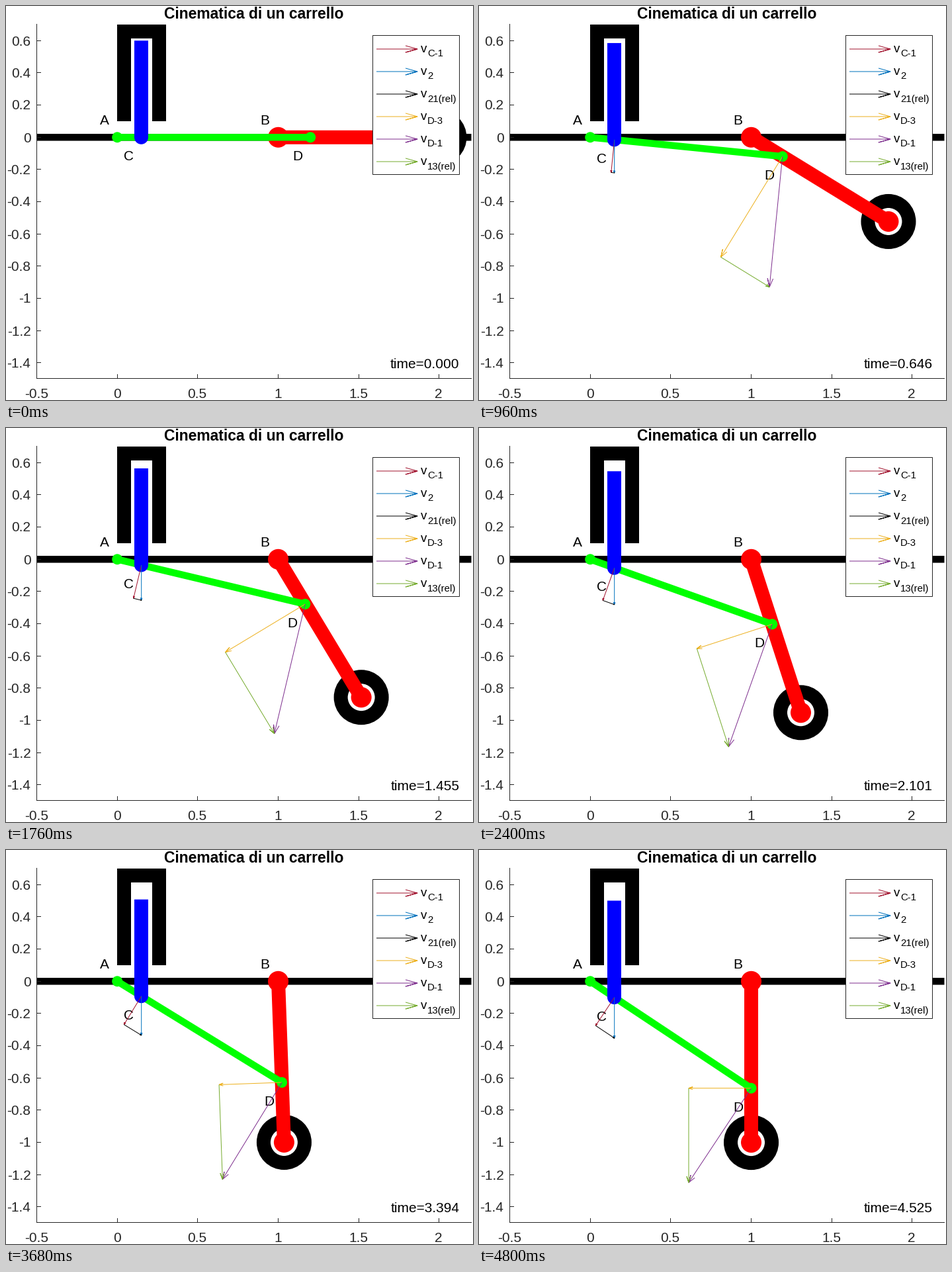
A matplotlib script that plays this animation: 706x595 px, repeating every 4.88 s.

```python
import numpy as np
import matplotlib.pyplot as plt
from matplotlib.animation import FuncAnimation
from matplotlib.patches import Circle, Rectangle

W, H, DPI = 706, 595, 100
FRAMES, INTERVAL = 61, 80
UNIT, X0, Y0 = 243.33, 168.2, 198.3
PX = 72 / DPI
DARK = "#262626"
GREEN = "#00ff00"
STEP = 8 / 99
ARM, CRANK_X = 1.2, 0.15
END_ANGLE = np.arccos(1 / ARM)

plt.rcParams["font.family"] = "Liberation Sans"
plt.rcParams["path.snap"] = False
fig = plt.figure(figsize=(W / DPI, H / DPI), dpi=DPI, facecolor="white")
ax = fig.add_axes([0, 0, 1, 1])
ax.set_xlim(0, W)
ax.set_ylim(H, 0)
ax.axis("off")


def to_px(p):
    return np.array([X0 + UNIT * p[0], Y0 - UNIT * p[1]])


def line(xs, ys, color, width, z):
    return ax.plot(xs, ys, color=color, lw=width * PX, zorder=z, snap=False,
                   solid_capstyle="butt", solid_joinstyle="bevel")[0]


def disc(center, radius, color, z):
    return ax.add_patch(Circle(center, radius, fc=color, ec="none", zorder=z))


def box(x, y, w, h, color, z):
    return ax.add_patch(Rectangle((x, y), w, h, fc=color, ec="none", zorder=z,
                                  snap=False))


def label(x, y, s, size=15, ha="center", color="black", z=8, **kw):
    return ax.text(x, y, s, fontsize=size, ha=ha, va="baseline",
                   color=color, zorder=z, **kw)


def arrow_points(start, end, head, spread):
    """Shaft followed by an open V-shaped head."""
    start, end = np.asarray(start, float), np.asarray(end, float)
    d = end - start
    n = np.array([-d[1], d[0]])
    back = end - head * d
    side = head * spread * n
    return np.array([start, end, back + side, end, back - side]).T


def draw_axes():
    line([46.5, 46.5], [27, 563], DARK, 1, 7)
    line([46, 704], [562.5, 562.5], DARK, 1, 7)
    for v in np.arange(-0.5, 2.1, 0.5):
        x = np.floor(X0 + UNIT * v) + 0.5
        line([x, x], [556, 562], DARK, 1, 7)
        label(x - 0.7, 592, f"{v:g}", color=DARK)
    for k in range(-7, 4):
        y = np.floor(Y0 - UNIT * k / 5) + 0.5
        line([47, 53], [y, y], DARK, 1, 7)
        label(37.5, y + 7, f"{k / 5:g}", ha="right", color=DARK)
    label(375, 19, "Cinematica di un carrello", 16.5, weight="bold")


VECTORS = [
    ("C-1", "#A2142F"), ("2", "#0072BD"), ("21(rel)", "black"),
    ("D-3", "#EDB120"), ("D-1", "#7E2F8E"), ("13(rel)", "#77AC30"),
]


def draw_legend():
    ax.add_patch(Rectangle((554.5, 44.5), 131, 210, fc="white", ec=DARK,
                           lw=PX, zorder=10, snap=False))
    for i, (sub, color) in enumerate(VECTORS):
        y = 65 + 34 * i
        line(*arrow_points((560, y), (622, y), 0.29, 0.28), color, 1, 11)
        label(627, y + 4.5, "v", 13.5, ha="left", z=11)
        label(637, y + 11.5, sub, 10.8, ha="left", z=11)


draw_axes()
draw_legend()

# Fixed frame and piston guide
line([47, 703.5], [Y0, Y0], "black", 10.5, 1)
box(168, 28, 74, 21, "black", 1)
box(168, 28, 21, 146, "black", 1)
box(221, 28, 21, 146, "black", 1)
label(148.5, 179, "A")
label(391.5, 179, "B")

# Moving parts
A, B = to_px((0, 0)), to_px((1, 0))
tyre = ax.add_patch(Circle(B, 31, fill=False, ec="black", lw=21 * PX, zorder=2))
strut = line([], [], "red", 21, 3)
disc(B, 15.5, "red", 3)
hub = disc(B, 15.5, "red", 3)
arm = line([], [], GREEN, 10.5, 4)
disc(A, 8, GREEN, 4)
pin = disc(A, 8, GREEN, 4)
piston = box(194, 52, 21, 100, "blue", 5)
piston_end = disc(A, 10.5, "blue", 5)
c_label = label(185.5, 0, "C")
d_label = label(0, 0, "D")
clock = label(685.5, 547, "", ha="right")
arrows = [line([], [], color, 1, 9) for _, color in VECTORS]


def time_at(i):
    # The first moments are sampled more finely
    return STEP * (i / 5) ** 2 if i < 5 else STEP * (i - 4)


def drop_at(t):
    return 0.0231 * t + 0.001225 * t**2 - 0.0005 * (1 - np.exp(-t / 0.0216))


def speed_at(t):
    return (0.1941 + 0.01838 * t - 0.001186 * t**2) * (1 - np.exp(-t / 0.0216))


def segment(ln, p, q):
    ln.set_data([p[0], q[0]], [p[1], q[1]])


def update(i):
    t = time_at(i)
    theta = min(np.arctan(drop_at(t) / CRANK_X), END_ANGLE)
    c = np.array([CRANK_X, -CRANK_X * np.tan(theta)])
    d = ARM * np.array([np.cos(theta), -np.sin(theta)])
    phi = np.arctan2(-d[1], d[0] - 1)
    wheel = to_px((1 + np.cos(phi), -np.sin(phi)))
    cp, dp = to_px(c), to_px(d)

    tyre.center = hub.center = wheel
    segment(strut, B, wheel)
    segment(arm, A, dp)
    pin.center = dp
    top = to_px((0, 0.6 + c[1]))[1]
    piston.set_y(top)
    piston.set_height(cp[1] - top)
    piston_end.center = (204.5, cp[1])
    c_label.set_y(cp[1] + 35)
    d_label.set_position((dp[0] - 19.5, dp[1] + 35))
    clock.set_text(f"time={t:.3f}")

    # Velocities at C (double scale) and D
    v2 = speed_at(t)
    turn = np.array([-np.sin(theta), -np.cos(theta)])
    swing = np.array([-np.sin(phi), -np.cos(phi)])
    c1 = c + v2 * np.cos(theta) * turn
    c2 = c + np.array([0, -v2])
    vd = 4 * v2 * np.cos(theta) ** 2
    d1 = d + vd * turn
    d3 = d + vd * np.cos(phi - theta) * swing
    ends = [(c, c1), (c, c2), (c1, c2), (d, d3), (d, d1), (d3, d1)]
    for ln, (p, q) in zip(arrows, ends):
        ln.set_data(*arrow_points(to_px(p), to_px(q), 0.065, 0.33))
        ln.set_visible(t > 0)
    return []


anim = FuncAnimation(fig, update, frames=FRAMES, interval=INTERVAL,
                     repeat=True, repeat_delay=0, blit=False)
plt.show()
```
